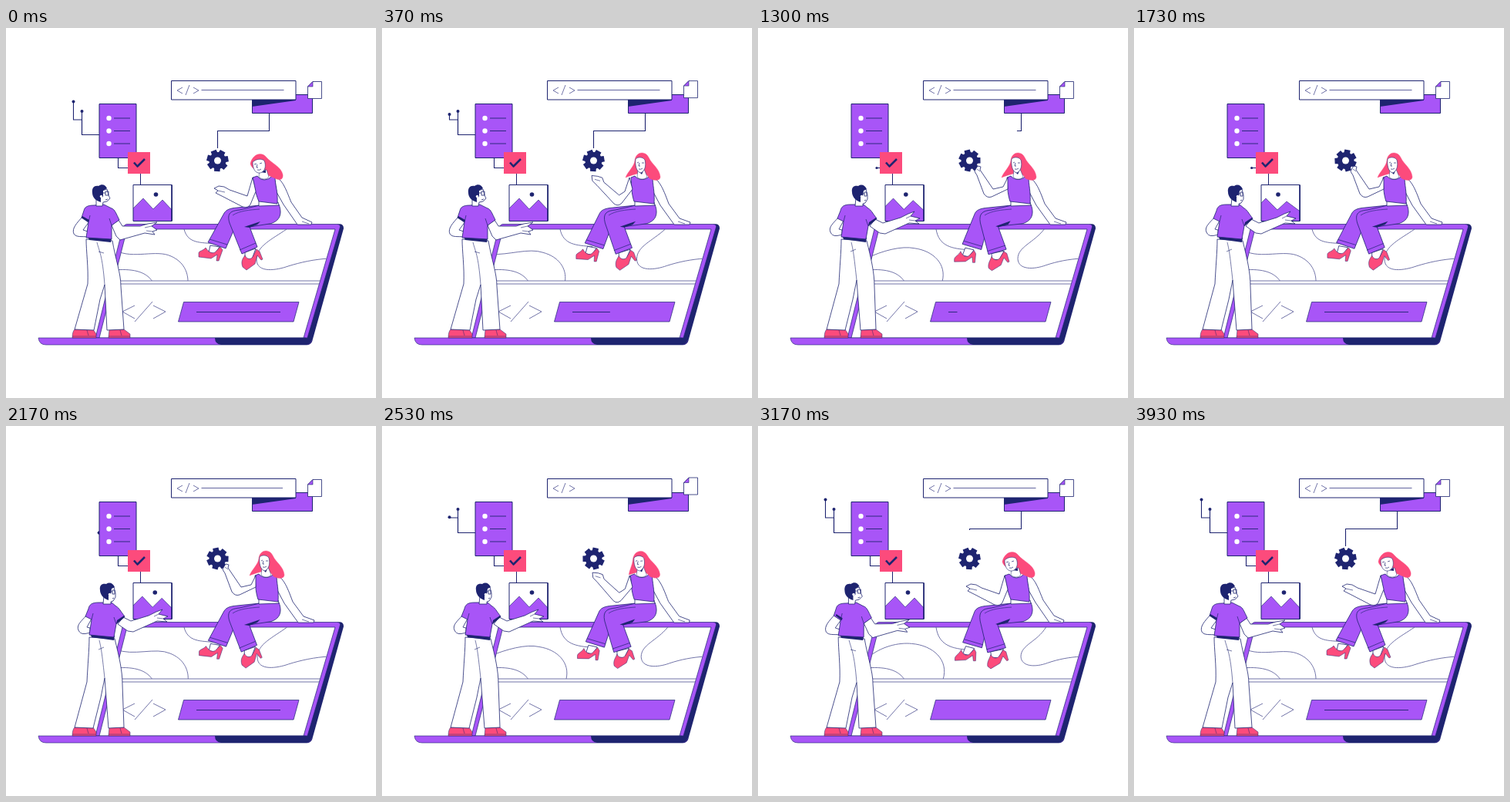
Write an HTML page with a canvas that moves like this. It is 480 px wide and 480 px high and loops after 3.97 s.

```html
<!DOCTYPE html>
<html lang="en">
<head>
<meta charset="utf-8">
<title>Building a site</title>
<style>
html, body { margin: 0; width: 100%; height: 100%; overflow: hidden; background: #fff; }
canvas { display: block; width: 100vw; height: 100vh; }
</style>
</head>
<body>
<canvas id="stage"></canvas>
<script>
const LOOP = 3970, HALF = LOOP / 2;
const PURPLE = '#a855f7', NAVY = '#1e2470', PINK = '#fc4b7c', WHITE = '#fff', THIN = '#62659f';
const canvas = document.getElementById('stage');
const ctx = canvas.getContext('2d');
const dpr = window.devicePixelRatio || 1;
canvas.width = canvas.height = 480 * dpr;

// Timing helpers
const ramp = (t, a, b) => {
  const u = Math.min(1, Math.max(0, (t - a) / (b - a)));
  return u * u * (3 - 2 * u);
};
const hold = (t, a, b, c, d) => ramp(t, a, b) - ramp(t, c, d);

// Blend two path strings that share the same commands
function mix(a, b, k) {
  const nums = b.match(/-?\d+(\.\d+)?/g);
  let i = 0;
  return a.replace(/-?\d+(\.\d+)?/g, n => (+n + (nums[i++] - n) * k).toFixed(2));
}
const mix3 = (a, b, c, k) => k < 0.5 ? mix(a, b, k * 2) : mix(b, c, k * 2 - 1);

function shape(d, fill, stroke = NAVY, width = 0.8) {
  const path = new Path2D(d);
  if (fill) { ctx.fillStyle = fill; ctx.fill(path); }
  if (stroke) {
    ctx.strokeStyle = stroke;
    ctx.lineWidth = width;
    ctx.stroke(path);
  }
}
const line = (d, color = NAVY, width = 0.9) => shape(d, null, color, width);
const box = (x, y, w, h, fill, stroke) => shape(`M${x},${y}h${w}v${h}h${-w}Z`, fill, stroke, 1);

function dot(x, y, r, color) {
  ctx.fillStyle = color;
  ctx.beginPath();
  ctx.arc(x, y, r, 0, Math.PI * 2);
  ctx.fill();
}

function clipped(d, draw) {
  ctx.save();
  ctx.clip(new Path2D(d));
  draw();
  ctx.restore();
}

// Draws the first part of a polyline, optionally with a dot at its tip
function trail(points, length, tip) {
  if (length <= 0.2) return;
  let [x, y] = points[0], left = length, d = `M${x},${y}`;
  for (const [px, py] of points.slice(1)) {
    const seg = Math.hypot(px - x, py - y);
    const k = Math.min(1, left / seg);
    x += (px - x) * k;
    y += (py - y) * k;
    d += `L${x},${y}`;
    left -= seg;
    if (left <= 0) break;
  }
  line(d, NAVY, 1.1);
  if (tip) dot(x, y, tip, NAVY);
}

function drawLaptop(q, wave) {
  shape('M430,254.5 Q438,253 438,260 L397,407 Q395,411 390,411 L384,402Z', NAVY, null);
  shape('M157,254.5 L430,254.5 Q435,255 433,260 L391,402 L116,402 L151,261 Q153,254.5 157,254.5Z', PURPLE, NAVY, 0.7);
  shape('M157,261 L427,261 L386,402 L121,402Z', WHITE, NAVY, 0.7);

  clipped('M157,261 L427,261 L407,328 L139,328Z', () => {
    line(mix('M143,289 C165,300 195,287 214,296 C230,303 236,316 236,329',
             'M140,305 C158,282 180,279 196,279 C226,280 251,300 241,329', wave), THIN);
    line('M138,314 C163,312 181,315 190,329', THIN);
    line(mix('M231,261 C236,280 252,278 272,280', 'M231,261 C234,285 250,292 276,293', wave), THIN);
    line(mix('M364,261 C345,274 325,283 325,300 C325,319 352,314 366,309 C382,304 400,300 419,299',
             'M376,261 C366,282 345,284 345,299 C346,311 362,313 378,307 C392,302 405,300 419,299', wave), THIN);
  });
  line('M139,328 H407 M138,332 H406', THIN);

  const squeeze = Math.sin(Math.PI * Math.min(1, Math.max(0, (q - 540) / 630))) ** 2;
  line(mix('M167,360 L151,368 L167,377 M190,355 L167,381 M191,360 L207,368 L191,377',
           'M171,359 L155,368 L171,377 M182,352 L174,384 M186,360 L201,368 L186,376', squeeze), THIN);

  shape('M230.5,355.5 L380,355.5 L373,381 L223.5,381Z', PURPLE, NAVY, 0.7);
  const len = 109 * (1 - hold(q, 200, 520, 1200, 1700));
  if (len > 0.3) line(`M247,368.5 h${len}`);

  shape('M42,402 H388 L397,405 Q395,411 390,411 H52 Q43,411 42,402Z', PURPLE, NAVY, 0.6);
  shape('M271,402 H389 L397,404 Q395,411 390,411 H279 Q271,410 271,402Z', NAVY, null);
}

function drawPanels(t, q) {
  // Search bar with the purple strip behind it
  const wire = 113 * (1 - hold(t, 900, 1500, 2700, 3350));
  trail([[341.5, 110], [341.5, 133.5], [274.5, 133.5], [274.5, 157]], wire);
  box(319.5, 86.5, 78, 24, PURPLE, NAVY);
  shape('M319,93 H376 V94 L319,102Z', NAVY, null);
  box(214.5, 68.5, 161.5, 24.5, WHITE, NAVY);
  line('M229,77 L222,81 L229,85 M238,74 L233,87 M243,77 L250,81 L243,85', THIN);
  const len = 107 * (1 - hold(t, 2150, 2450, 2600, 3000));
  if (len > 0.3) line(`M253.5,80.5 h${len}`, THIN, 1);

  ctx.save();
  ctx.translate(0, -2.5 * hold(q, 250, 550, 550, 1000));
  shape('M398,69.5 H409.5 V91.5 H391.5 V76Z', WHITE, NAVY);
  shape('M398,69.5 V76 H391.5Z', PURPLE, NAVY, 0.6);
  ctx.restore();

  // Branch of two nodes beside the list card
  const reach = 77 * (1 - hold(t, 250, 650, 2150, 2750));
  trail([[121, 138.5], [98.5, 138.5], [98.5, 119], [87.5, 119], [87.5, 95.5]], reach, 2);
  trail([[121, 138.5], [98.5, 138.5], [98.5, 108]], reach, 2);

  const link = 26 * (1 - hold(t, 1000, 1400, 1600, 2050));
  trail([[158, 181.5], [145.5, 181.5], [145.5, 168]], link, link < 25 ? 1.6 : 0);
  line('M174.5,189 V203', NAVY, 1);

  box(121, 98.5, 48, 70, PURPLE, NAVY);
  for (const y of [117, 133.5, 150]) {
    dot(133.5, y, 3.2, WHITE);
    line(`M140,${y} H161`);
  }
  box(158, 161, 29, 28, PINK, null);
  line('M166,174.5 L170.5,179.5 L180,170', NAVY, 2.6);

  // Picture card
  const pan = hold(t, 1100, 1600, 1800, 2300);
  box(165, 203.5, 50, 47, WHITE, null);
  clipped('M165,203 h50 v48 h-50Z', () => {
    shape(mix('M164,235 L178,221 L191,235 L203,223 L217,238 V251 H164Z',
              'M164,228 L171,221 L186,236 L198,225 L217,239 V251 H164Z', pan), PURPLE, NAVY, 0.6);
    dot(194.5 - 7.5 * pan, 216, 2.8, NAVY);
  });
  box(165, 203.5, 50, 47, null, NAVY);
  line('M215.2,203.5 V250.5', NAVY, 1.6);
}

function drawGear(t) {
  const teeth = 7, step = Math.PI * 2 / teeth;
  ctx.save();
  ctx.translate(274.5, 172);
  ctx.rotate(-1.07 + step * 2 * ramp(t, 900, 3100));
  ctx.beginPath();
  for (let i = 0; i < teeth; i++) {
    for (const [r, a] of [[11, -0.36], [14.5, -0.26], [14.5, 0.26], [11, 0.36]]) {
      const ang = i * step + a;
      ctx.lineTo(r * Math.cos(ang), r * Math.sin(ang));
    }
  }
  ctx.closePath();
  ctx.fillStyle = NAVY;
  ctx.fill();
  ctx.restore();
  dot(274.5, 172, 4.5, WHITE);
}

function drawWoman(t, swing) {
  const lean = hold(t, 30, 330, 2300, 3050);
  const lift = hold(t, 100, 650, 2250, 2850);
  const body = (a, b, fill, stroke, w) => shape(mix(a, b, lean), fill, stroke, w);
  const leg = (a, b, fill, stroke, w) => shape(mix(a, b, swing), fill, stroke, w);

  // Supporting arm
  body('M348,193 C359,195 364,212 370,226 L384,246 L397,252 L396,255 L378,255 L360,229 L351,213Z',
       'M349,193 C360,195 366,212 372,228 L386,247 L400,252 L399,255 L379,255 L361,230 L352,213Z', WHITE);
  line('M384,251 L393,254', NAVY, 0.6);

  // Feet
  leg('M265,282 L263,291 L271,293 L277,284Z', 'M270,286 L266,296 L274,298 L281,289Z', WHITE);
  leg('M250,292 C250,289 256,289 259,285 C263,291 267,293 271,291 L278,284 L281,288 L276,302 L273,302 L274,294 L266,299 L250,297Z',
      'M256,302 C257,298 261,297 264,291 C266,297 270,299 274,297 L281,290 L283,294 L283,305 L280,305 L279,298 L270,304 L256,305Z', PINK, NAVY, 0.5);
  leg('M310,291 L310,300 L319,300 L324,286Z', 'M301,293 L302,300 L311,301 L318,290Z', WHITE);
  leg('M307,310 C304,302 308,298 310,295 C313,301 318,300 320,297 L325,287 L329,290 L333,300 L331,301 L326,295 L323,306 L312,314Z',
      'M297,312 C296,306 300,302 301,297 C304,302 309,302 312,299 L317,291 L321,293 L324,304 L322,305 L317,299 L313,308 L301,315Z', PINK, NAVY, 0.5);

  // Trousers
  leg('M329,230 L300,233 C289,234 285,236 282,242 L262,278 L285,286 L296,261 L318,250Z',
      'M329,230 L300,233 C287,234 282,236 280,243 L266,281 L291,288 L297,261 L318,250Z', PURPLE);
  leg('M354,229 C360,244 352,252 342,254 L316,258 L326,284 L306,293 L290,253 C286,240 292,237 303,236 L329,230Z',
      'M354,229 C360,244 352,252 342,254 L310,257 L321,288 L297,294 L288,253 C286,240 292,237 303,236 L329,230Z', PURPLE);
  leg('M309,258 L330,251 L326,255 L316,259Z', 'M308,257 L327,250 L324,255 L311,258Z', NAVY, null);
  leg('M264,274 L287,281 M303,288 L324,279', 'M268,277 L292,284 M296,290 L320,283', null, NAVY, 0.7);
  line('M329,235 C316,236 303,237 294,243', NAVY, 0.6);

  // Torso
  body('M328,224 L353,226 L354,230 L328,231Z', 'M328,224 L353,226 L354,230 L328,231Z', WHITE);
  body('M320,194 L326,192 C331,199 340,198 345,192 L349,193 C349,204 353,211 352,228 L328,225 C323,213 322,204 320,194Z',
       'M323,194 L328,192 C333,198 342,198 347,192 L351,193 C351,204 354,211 353,228 L327,225 C323,213 324,204 323,194Z', PURPLE);

  // Hair, neck and face
  body('M317,176 C320,163 332,160 338,168 C344,175 357,180 359,190 C360,197 355,198 349,195 C342,192 338,190 335,190 C328,188 318,182 317,176Z',
       'M328,172 C329,160 342,159 346,168 C350,177 360,182 361,193 C361,199 352,198 347,195 C342,186 334,187 316,194 C319,186 327,180 328,172Z', PINK, PINK, 0.4);
  body('M329,184 L338,184 L341,193 C338,197 332,197 328,193Z',
       'M332,184 L340,183 L344,193 C341,197 334,197 331,193Z', WHITE, NAVY, 0.5);
  body('M330,187 L337,184 L337,188Z', 'M332,185 L340,183 L337,190Z', NAVY, null);
  body('M320,174 C324,170 331,169 335,172 C338,179 336,186 330,188 C323,189 320,182 320,174Z',
       'M329,170 C332,167 338,167 341,171 C343,179 341,185 336,188 C330,187 328,178 329,170Z', WHITE, NAVY, 0.6);
  body('M322,177 L325,176 M329,176 L332,175 M326,177 L325,181 L327,181 M326,184 Q329,185 331,183',
       'M331,175 L333,174 M337,175 L340,175 M334,175 L333,179 L335,179 M333,183 Q336,184 338,182', null, NAVY, 0.7);

  // Reaching arm
  const arm = mix3(
    'M320,194 L313,218 L290,210 L283,206 L276,205 L270,208 L275,211 L272,214 L282,219 L307,232 Q314,234 317,229 L324,212Z',
    'M321,194 L315,212 L308,217 L288,200 L286,194 L280,192 L272,191 L273,198 L279,204 L301,228 Q306,232 311,227 L325,209Z',
    'M324,194 L318,206 L305,209 L288,184 L289,180 L285,179 L283,182 L281,186 L284,191 L293,215 Q297,221 303,219 L324,209Z', lift);
  shape(arm, WHITE);
  line(mix3('M275,211 L284,213', 'M276,196 L283,198', 'M284,183 L288,186', lift), NAVY, 0.6);
}

function drawMan(t) {
  const turn = hold(t, 380, 820, 2650, 3250);
  const part = (a, b, fill, stroke, w) => shape(mix(a, b, turn), fill, stroke, w);

  // Shoes
  shape('M89,391 H113 L117,397 V402 H86 Q86,394 89,391Z', PINK, NAVY, 0.5);
  shape('M134,391 H153 L161,397 V402 H133Z', PINK, NAVY, 0.5);
  line('M86,400 H117 M133,400 H161 M105,392 L107,399 M148,392 L150,399', NAVY, 0.5);

  // Trousers
  part('M104,274 L138,276 C142,300 149,318 149,335 L153,391 L131,392 L128,333 L122,352 L114,392 L89,391 L106,332 C107,310 104,290 104,274Z',
       'M108,274 L141,276 C147,300 151,318 151,335 L153,391 L133,392 L128,327 L123,352 L113,392 L89,391 L105,332 C106,310 108,290 108,274Z', WHITE);
  part('M118,278 C121,290 125,294 128,333 M120,290 L127,292', 'M121,278 C124,290 125,300 128,327 M120,290 L127,287', null, NAVY, 0.6);

  // Arms
  part('M99,245 C92,253 85,260 88,267 C91,272 99,270 106,271 L106,264 L100,262 L108,251Z',
       'M104,246 C98,253 91,258 94,265 C97,271 102,270 109,268 L109,262 L105,261 L111,250Z', WHITE);
  part('M146,249 L151,257 L174,257 L184,254 L196,252 L189,257 L196,262 L190,264 L193,268 L180,266 L148,275 L143,270 L137,256Z',
       'M152,248 L162,253 L185,246 L195,241 L203,238 L198,244 L210,247 L204,250 L209,254 L196,253 L165,267 L158,266 L145,257Z', WHITE);
  part('M189,257 L180,259 M190,264 L182,263', 'M198,244 L192,247 M204,250 L196,249', null, NAVY, 0.6);

  // Shirt
  part('M105,269 L137,272 L136,278 L108,275Z', 'M109,269 L141,272 L140,278 L111,274Z', NAVY, null);
  part('M114,230 C106,230 102,232 101,237 L98,246 L107,252 L104,272 L137,274 L137,256 L147,249 C143,241 141,235 137,234 L127,229Z',
       'M120,229 C111,229 108,232 107,237 L103,247 L111,251 L108,271 L140,274 L143,257 L154,247 C149,241 147,236 143,234 L137,229Z', PURPLE);
  part('M137,256 L134,247 M107,252 L109,243', 'M143,257 L140,248 M111,251 L113,243', null, NAVY, 0.7);
  part('M99,244 L98,246 L107,252 L108,249Z', 'M153,246 L154,248 L143,257 L144,252Z', NAVY, null);

  // Head
  part('M121,222 L124,211 L131,209 L133,217 L135,221 L131,225 L126,226 L125,231 L117,231 L117,220Z',
       'M130,222 L134,211 L140,209 L142,217 L142,222 L139,227 L136,228 L136,231 L126,231 L127,220Z', WHITE);
  part('M112,214 C111,207 115,204 120,205 C124,202 129,203 131,208 L126,211 L126,219 L123,220 L123,226 C116,224 112,219 112,214Z',
       'M122,213 C121,206 125,204 130,205 C134,202 139,204 141,209 L137,211 L136,218 L133,220 L133,226 C126,224 122,218 122,213Z', NAVY, null);
  part('M125,214 L129,214 M129,212 H133 V217 H129Z M129,223 L132,222',
       'M134,215 L138,215 M138,213 H141 V218 H138Z M138,224 L140,223', null, NAVY, 0.8);
  dot(123.5 + 11 * turn, 218.5, 1.7, WHITE);
}

function draw(t) {
  const q = t % HALF;
  const swing = (1 - Math.cos(2 * Math.PI * q / HALF)) / 2;
  const wave = hold(q, 60, 960, 960, 1750);
  ctx.setTransform(dpr, 0, 0, dpr, 0, 0);
  ctx.fillStyle = WHITE;
  ctx.fillRect(0, 0, 480, 480);
  ctx.lineJoin = 'round';
  drawLaptop(q, wave);
  drawPanels(t, q);
  drawGear(t);
  drawWoman(t, swing);
  drawMan(t);
}

const start = performance.now();
function tick() {
  draw((performance.now() - start) % LOOP);
  requestAnimationFrame(tick);
}
tick();
</script>
</body>
</html>
```
